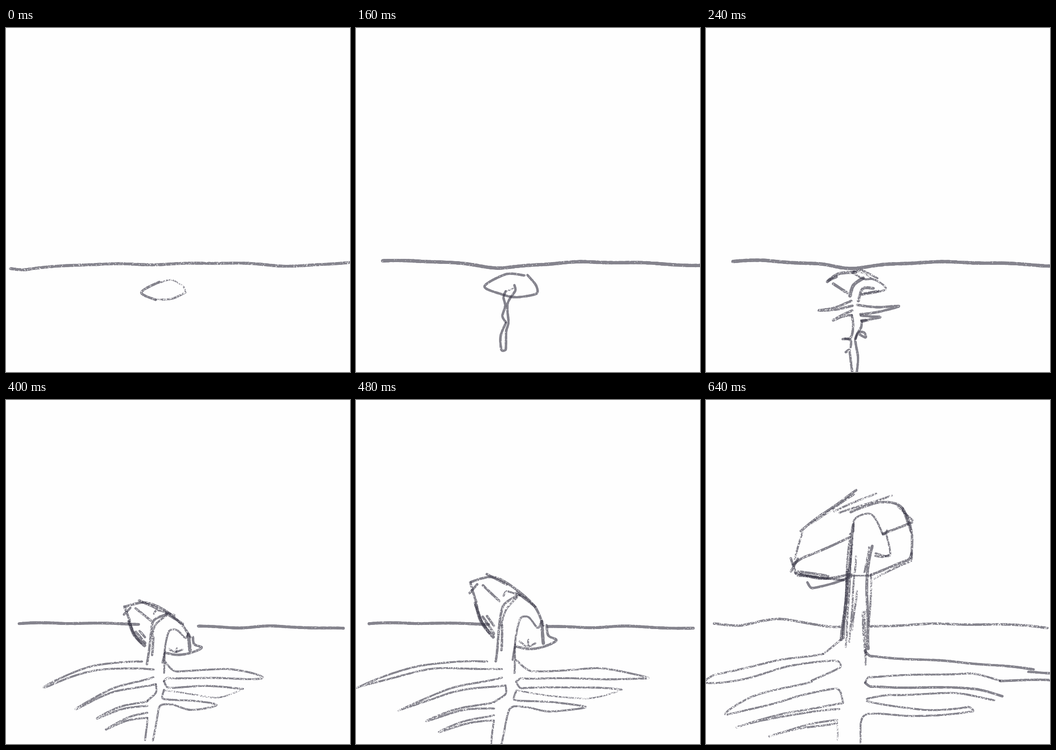
An HTML page with a canvas for the animation above (0.72 s loop, 748 by 748 pixels).

```html
<!DOCTYPE html>
<html lang="en">
<head>
<meta charset="utf-8">
<title>Sprouting seed</title>
<style>
  html, body { margin: 0; height: 100%; overflow: hidden; background: #fefefe; }
  canvas { display: block; width: 748px; height: 748px; }
</style>
</head>
<body>
<canvas id="stage" width="748" height="748"></canvas>
<script>
const SIZE = 748, STEP = 80;
const newCanvas = () => Object.assign(document.createElement('canvas'), { width: SIZE, height: SIZE });
const layer = newCanvas(), pen = layer.getContext('2d');
pen.lineCap = 'round';
pen.strokeStyle = 'rgb(52,50,66)';

let ctx, width, grain, place = p => p;
let state = 7;
const rand = () => (state = state * 16807 % 2147483647) / 2147483647;
const dist = (a, b) => Math.hypot(b[0] - a[0], b[1] - a[1]);

// Smooth curve through the points, with tangents kept short at sharp turns.
function curve(pts) {
  const tangents = pts.map((p, i) => {
    const a = pts[i - 1] || p, b = pts[i + 1] || p;
    const reach = Math.min(dist(a, p) || dist(p, b), dist(p, b) || dist(a, p));
    const k = Math.min(0.5, reach / (dist(a, b) || 1));
    return [(b[0] - a[0]) * k, (b[1] - a[1]) * k];
  });
  const out = [pts[0]];
  for (let i = 1; i < pts.length; i++) {
    const a = pts[i - 1], b = pts[i], n = Math.ceil(dist(a, b) / 2);
    for (let j = 1; j <= n; j++) {
      const t = j / n, u = 1 - t;
      out.push([0, 1].map(c =>
        u * u * (1 + 2 * t) * a[c] + t * t * (3 - 2 * t) * b[c] +
        t * u * (u * tangents[i - 1][c] - t * tangents[i][c])));
    }
  }
  return out;
}

const pencil = (w, g) => { width = w; grain = g; };

// Grainy pencil stroke through x, y, x, y ...
function line(...n) {
  const pts = [];
  for (let i = 0; i < n.length; i += 2) pts.push(place([n[i], n[i + 1]]));
  const phase = rand() * 6;
  const path = curve(pts).map(([x, y], i) =>
    [x + 0.6 * Math.sin(i * 0.13 + phase), y + 0.9 * Math.sin(i * 0.09 + phase)]);
  pen.clearRect(0, 0, SIZE, SIZE);
  for (let i = 1; i < path.length; i++) {
    pen.lineWidth = width * (0.9 + 0.2 * rand());
    pen.beginPath();
    pen.moveTo(...path[i - 1]);
    pen.lineTo(...path[i]);
    pen.stroke();
  }
  pen.globalCompositeOperation = 'destination-out';
  path.forEach(([x, y], i) => {
    const chance = grain / 9 * (0.7 + 0.3 * Math.sin(i * 0.17 + phase));
    for (let k = 0; k < 3; k++) {
      if (rand() > chance) continue;
      pen.beginPath();
      pen.arc(x + (rand() - 0.5) * width * 1.3, y + (rand() - 0.5) * width * 1.3,
        0.4 + rand() * (0.4 + grain / 10), 0, 7);
      pen.fill();
    }
  });
  pen.globalCompositeOperation = 'source-over';
  ctx.drawImage(layer, 0, 0);
}

// Root: out from the first point to the tip and back, both sides bowed.
const root = (x0, y0, tx, ty, x1, y1, bow) =>
  line(x0, y0, (x0 + tx) / 2, (y0 + ty) / 2 + bow, tx, ty,
    (x1 + tx) / 2, (y1 + ty) / 2 + bow, x1, y1);

// Draw something scaled about a point and shifted down.
function fit(cx, cy, sx, sy, dy, ...parts) {
  place = ([x, y]) => [cx + (x - cx) * sx, cy + (y - cy) * sy + dy];
  parts.forEach(part => part());
  place = p => p;
}

const seed = {
  ground() {
    pencil(6, 3);
    line(10, 523, 38, 525, 180, 514, 320, 514, 480, 511, 600, 517, 655, 517, 748, 509);
  },
  cap() {
    pencil(5, 3);
    line(334, 553, 294, 575, 325, 590);
    pencil(4, 6);
    line(325, 590, 362, 588, 391, 576);
    pencil(3, 7);
    line(391, 574, 385, 562, 359, 547, 332, 554);
  }
};

const sprout = {
  ground() {
    pencil(7, 1);
    line(58, 507, 130, 506, 250, 514, 315, 522, 400, 514, 490, 509, 620, 511, 748, 517);
  },
  cap() {
    pencil(5, 1);
    line(367, 539, 325, 535, 280, 562, 320, 581, 350, 585, 392, 577, 391, 560, 373, 538);
  },
  stem() {
    pencil(5, 1);
    line(345, 560, 347, 572, 329, 600, 332, 640, 327, 660, 325, 700, 316, 701, 315, 670, 326, 640);
    line(326, 640, 318, 626, 324, 603, 321, 585, 326, 572);
    pencil(3, 6);
    line(326, 572, 341, 566);
  }
};

const shoot = {
  cap() {
    pencil(6, 4);
    line(258, 543, 285, 525, 325, 521);
    line(262, 541, 280, 532);
    line(272, 548, 306, 572);
    line(331, 590, 342, 560, 368, 560);
    pencil(7, 2);
    line(311, 578, 320, 552, 344, 535);
    pencil(4, 5);
    line(316, 518, 340, 515, 377, 536);
    line(318, 521, 345, 536, 370, 538, 396, 563, 340, 575);
    line(337, 573, 380, 567);
    pencil(3, 7);
    line(320, 520, 345, 523, 366, 538);
  },
  roots() {
    pencil(5, 4);
    root(310, 586, 180, 606, 313, 597, 4);
    root(312, 606, 238, 630, 310, 618, -2);
    line(310, 618, 315, 640, 307, 668, 275, 673);
    line(284, 671, 307, 676, 307, 692);
    line(286, 702, 302, 698, 312, 748);
    pencil(5, 2);
    root(332, 594, 497, 598, 345, 615, 3);
    root(345, 618, 424, 623, 350, 633, 0);
    line(347, 629, 365, 628);
    line(348, 630, 347, 645, 326, 673, 334, 715, 330, 748);
    line(326, 673, 336, 658, 358, 657, 364, 668, 338, 660);
  }
};

const bud = {
  ground() {
    pencil(6, 1);
    line(28, 486, 110, 485, 288, 487);
    line(418, 492, 500, 495, 570, 492, 734, 497);
  },
  cap() {
    pencil(5, 4);
    line(250, 396, 300, 386, 350, 412, 388, 450, 408, 490);
    line(284, 378, 328, 402);
    line(248, 396, 262, 440);
    line(263, 400, 247, 420);
    line(258, 440, 272, 478, 290, 508);
    line(276, 403, 312, 438);
    line(276, 472, 300, 508);
    line(285, 470, 299, 490);
    line(350, 419, 390, 450);
    pencil(7, 3);
    line(260, 444, 273, 482, 298, 516);
    line(403, 480, 408, 530);
    pencil(5, 3);
    line(415, 490, 418, 512, 435, 522, 405, 537, 375, 542, 348, 537);
    pencil(4, 5);
    line(356, 525, 372, 535, 390, 528);
    line(375, 522, 374, 533);
  },
  stem() {
    pencil(5, 4);
    line(350, 426, 318, 450, 304, 568);
    line(318, 490, 316, 543);
    pencil(4, 6);
    line(355, 425, 326, 455, 316, 490);
    line(320, 425, 328, 415, 370, 430);
    pencil(4, 3);
    line(345, 595, 346, 530, 357, 476, 375, 473, 395, 495, 402, 485);
    line(341, 566, 346, 532);
  },
  roots() {
    pencil(4, 4);
    root(285, 568, 0, 626, 318, 586, -20);
    root(318, 604, 92, 676, 325, 620, -12);
    line(325, 620, 325, 640, 300, 658);
    root(300, 658, 153, 698, 300, 670, -8);
    root(300, 685, 180, 722, 300, 697, -6);
    line(300, 697, 294, 748);
    line(348, 565, 385, 591, 530, 584, 635, 605, 500, 606, 360, 605, 348, 613);
    line(348, 613, 360, 627, 460, 624, 578, 629);
    line(348, 632, 345, 652, 430, 658, 500, 667, 425, 678, 370, 667, 335, 672, 316, 748);
    pencil(3, 7);
    line(578, 630, 495, 650, 348, 632);
  }
};

const hood = {
  ground() {
    pencil(6, 3);
    line(46, 476, 130, 479, 215, 475, 296, 486);
    pencil(5, 3);
    line(438, 491, 570, 497, 720, 494, 748, 489);
  },
  cap() {
    pencil(5, 4);
    line(195, 382, 230, 369, 312, 350);
    line(290, 350, 350, 370);
    line(205, 376, 242, 430, 275, 474, 320, 480);
    line(208, 384, 262, 445, 292, 477);
    pencil(4, 7);
    line(225, 362, 275, 345);
    line(230, 368, 255, 353, 335, 377);
    line(210, 378, 260, 370, 335, 377);
    line(250, 382, 280, 408, 315, 415);
    line(262, 383, 305, 410);
  },
  bill() {
    pencil(5, 2);
    line(378, 378, 405, 397);
    line(401, 405, 418, 398, 438, 430, 434, 488, 395, 510, 350, 495);
    line(408, 455, 436, 453);
    pencil(7, 2);
    line(386, 400, 408, 457);
    pencil(4, 5);
    line(362, 432, 385, 445, 415, 485, 432, 484);
    line(352, 492, 390, 498, 405, 480);
    line(358, 484, 380, 492);
    line(355, 503, 400, 513, 426, 500, 434, 440);
  },
  stem() {
    pencil(5, 3);
    line(308, 550, 304, 480, 322, 390, 360, 366, 378, 378);
    line(342, 587, 352, 480, 354, 448, 370, 443);
    pencil(7, 2);
    line(304, 480, 304, 553);
    pencil(4, 6);
    line(296, 550, 306, 485);
    line(311, 490, 312, 550);
    line(315, 505, 326, 550);
    line(358, 425, 360, 440, 412, 482);
  },
  roots() {
    pencil(6, 2);
    line(315, 544, 250, 547, 120, 573, 0, 597);
    pencil(4, 4);
    line(0, 595, 82, 575);
    line(40, 612, 170, 592, 315, 582, 318, 598);
    root(315, 602, 72, 674, 325, 622, -13);
    root(324, 645, 130, 688, 298, 670, -4);
    root(292, 690, 170, 724, 292, 700, -6);
    line(325, 622, 324, 645);
    line(292, 700, 294, 748);
    pencil(5, 2);
    line(350, 583, 525, 580, 610, 591, 682, 597, 680, 603);
    line(680, 603, 540, 596, 352, 603, 346, 622, 480, 629, 548, 641);
    pencil(4, 4);
    line(500, 639, 350, 640, 345, 654, 430, 665, 510, 672);
    line(450, 671, 350, 670, 325, 695, 317, 748);
  }
};

const bloom = {
  ground() {
    pencil(5, 5);
    line(18, 487, 70, 490, 160, 477, 275, 494, 293, 494);
    line(358, 493, 500, 487, 700, 490, 743, 496);
  },
  cap() {
    pencil(5, 4);
    line(327, 197, 250, 250, 205, 286);
    line(315, 244, 380, 222, 425, 232, 447, 290, 447, 345);
    line(428, 236, 445, 285);
    line(447, 332, 440, 348, 358, 380);
    line(385, 292, 448, 265);
    pencil(4, 7);
    line(322, 206, 230, 267);
    line(210, 285, 192, 352);
    line(278, 242, 370, 203);
    line(290, 246, 405, 207);
    line(410, 224, 450, 262);
    line(446, 350, 365, 388);
  },
  rim() {
    pencil(5, 4);
    line(190, 358, 215, 342, 310, 300);
    line(185, 345, 195, 378);
    line(184, 372, 200, 345);
    line(195, 376, 255, 388, 316, 380);
    line(200, 382, 300, 391);
    line(200, 373, 265, 383);
    line(205, 378, 265, 389);
    pencil(5, 1);
    line(220, 396, 230, 408, 280, 398, 315, 385);
    pencil(3, 3);
    line(318, 383, 356, 382);
  },
  stem() {
    pencil(4, 4);
    line(320, 285, 325, 258, 360, 250, 385, 292, 395, 282);
    line(392, 290, 400, 338, 368, 333);
    line(368, 339, 384, 342, 398, 338);
    pencil(6, 3);
    line(320, 270, 310, 380, 294, 520);
    line(308, 370, 304, 440, 298, 518);
    line(362, 318, 350, 380, 353, 540);
    pencil(4, 6);
    line(313, 290, 304, 395);
    line(318, 300, 304, 538);
    line(326, 340, 312, 525);
    line(328, 415, 318, 500);
    line(354, 320, 345, 375);
    line(360, 380, 355, 490);
    line(340, 460, 347, 575);
    line(345, 460, 348, 553);
    line(293, 520, 255, 552);
  },
  roots() {
    pencil(4, 5);
    line(255, 552, 150, 568, 20, 598, 0, 615, 90, 606, 180, 578, 285, 567, 292, 580, 230, 611);
    line(230, 612, 100, 645, 45, 684, 200, 645, 285, 627, 298, 658);
    root(298, 660, 66, 711, 290, 672, -6);
    root(285, 695, 138, 731, 285, 703, -4);
    pencil(3, 8);
    line(285, 700, 286, 738);
    pencil(5, 2);
    line(345, 545, 360, 558, 550, 570, 712, 585);
    line(700, 590, 748, 595);
    line(748, 609, 640, 610);
    line(346, 615, 360, 624, 580, 627, 645, 645);
    pencil(4, 4);
    line(640, 610, 570, 595, 355, 602, 346, 615);
    line(627, 653, 550, 638, 400, 642, 350, 650);
    line(350, 655, 470, 674, 570, 668, 580, 678, 450, 688, 347, 684, 336, 745);
  }
};

const all = drawing => () => Object.values(drawing).forEach(part => part());

function rooting() {
  fit(374, 515, 1, 0.7, 0, sprout.ground);
  fit(336, 560, 0.93, 0.95, 4, sprout.cap);
  fit(334, 572, 0.8, 0.5, 0, sprout.stem);
}

function branching() {
  sprout.ground();
  fit(328, 545, 0.92, 0.88, 8, shoot.cap);
  fit(325, 590, 0.55, 0.95, 8, shoot.roots);
}

function rising() {
  bud.ground();
  fit(335, 540, 0.9, 0.72, 12, bud.cap);
  fit(335, 590, 0.9, 0.76, 0, bud.stem);
  fit(330, 590, 0.75, 0.95, 0, bud.roots);
}

const scenes = [all(seed), rooting, all(sprout), branching, all(shoot),
  rising, all(bud), all(hood), all(bloom)];

const pictures = scenes.map(scene => {
  const picture = newCanvas();
  ctx = picture.getContext('2d');
  ctx.globalAlpha = 0.6;
  scene();
  return picture;
});

const stage = document.getElementById('stage').getContext('2d');
const start = performance.now();
function show(now) {
  const i = Math.floor(Math.max(0, now - start) / STEP) % pictures.length;
  stage.clearRect(0, 0, SIZE, SIZE);
  stage.drawImage(pictures[i], 0, 0);
  requestAnimationFrame(show);
}
show(start);
</script>
</body>
</html>
```
